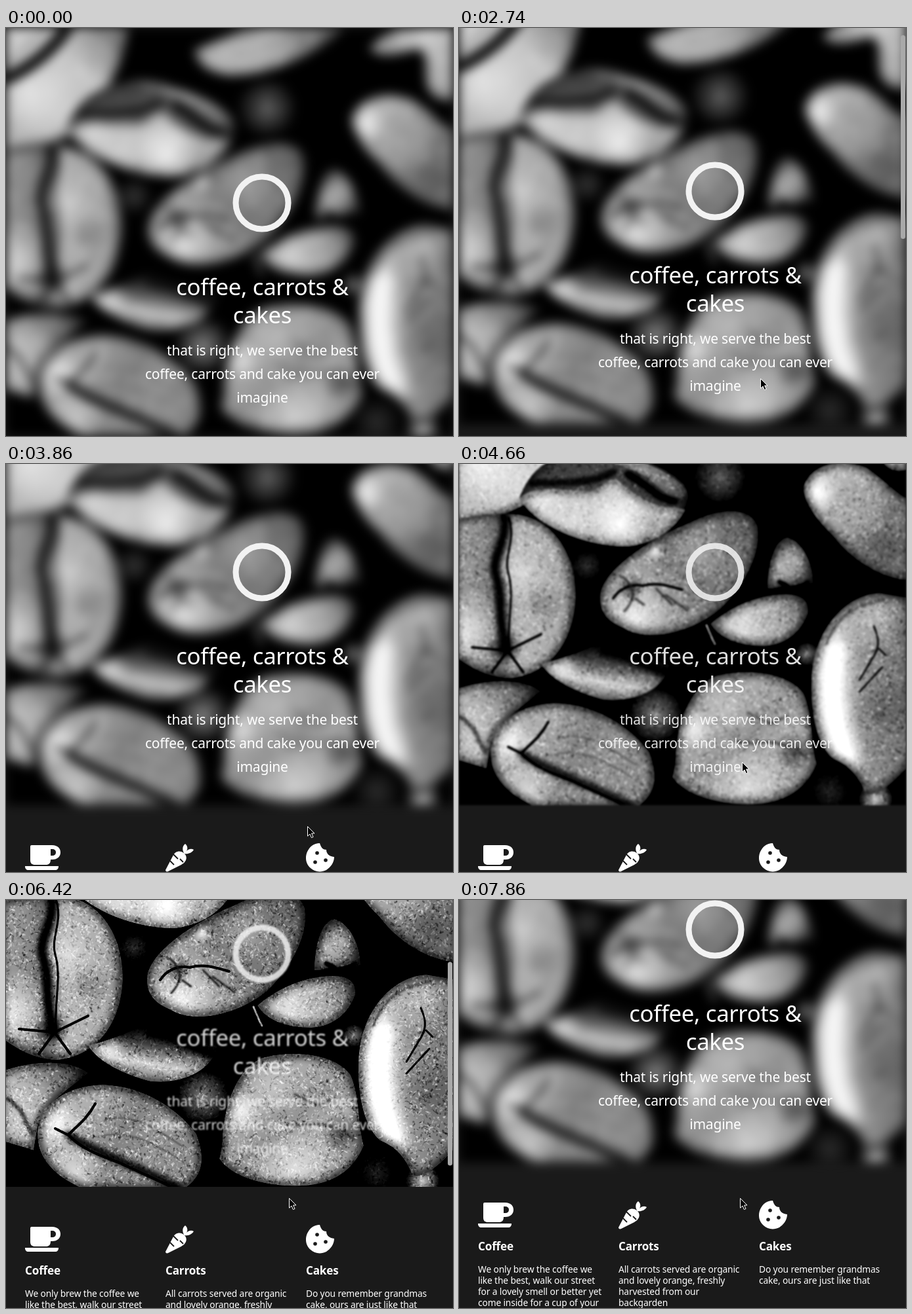
Animation, 681 px wide and 623 px high, one loop 8000 ms. Source, as an HTML page with a canvas:

```html
<!DOCTYPE html>
<html lang="en">
<head>
<meta charset="utf-8">
<title>coffee, carrots &amp; cakes</title>
<style>
  html, body { margin: 0; width: 100%; height: 100%; overflow: hidden; background: #1a1a1a; }
  #stage { position: relative; width: 681px; height: 623px; overflow: hidden; background: #1a1a1a; }
  #page, #page > *, #bar, #cursor { position: absolute; left: 0; top: 0; }
  #page { width: 681px; height: 1248px; }
  svg { overflow: visible; fill: #fff; }
  text { font-family: "Noto Sans", "Open Sans", sans-serif; letter-spacing: -.01em; }
  #hero text { text-anchor: middle; }
  .title { font-size: 34.8px; }
  .lead { font-size: 21px; }
  .head { font-size: 17.1px; font-weight: 700; }
  .copy { font-size: 13.77px; }
  #bar { left: 673px; width: 7px; height: 311px; border-radius: 4px; background: #a9a9a9; opacity: 0; }
</style>
</head>
<body>
<div id="stage">
  <div id="page">
    <canvas id="photo" width="681" height="623"></canvas>
    <svg id="hero" width="681" height="623">
      <circle cx="390" cy="267" r="40" fill="none" stroke="#f2f2f2" stroke-width="9"/>
    </svg>
    <svg id="info" width="681" height="1248">
      <path fill-rule="evenodd" d="M39 684H70C79 684 83 689 83 695S79 706 70 706H68C68 712 65 714 61 714H44C40 714 37 712 37 707V686Q37 684 39 684ZM68 690V700H70C74 700 76 698 76 695S74 690 70 690Z"/>
      <path d="M29 716H80C80 720 78 722 75 722H34C31 722 29 720 29 716Z"/>
      <path d="M243 722C243 724 245 725 247 724L267 714C275 710 277 702 272 697C266 691 258 693 255 699L243 722ZM271 696C268 690 269 685 273 682C277 685 277 690 275 693C279 689 283 689 286 691C283 696 277 698 272 697Z"/>
      <path d="M255 698L262 705M250 708L256 714M270 710L265 705" stroke="#1a1a1a" stroke-width="1.8" fill="none"/>
      <path d="M478 681C480 688 483 691 488 691C488 697 492 701 500 702C500 711 494 718 488 722C480 726 470 725 464 719C457 713 455 703 459 694C463 686 469 681 478 681Z"/>
      <g fill="#1a1a1a"><circle cx="474" cy="696" r="2.8"/><circle cx="471" cy="710" r="2.8"/><circle cx="487" cy="707" r="2.8"/></g>
    </svg>
  </div>
  <div id="bar"></div>
  <svg id="cursor" width="14" height="20"><path d="M.5 .5V15.2L4 12L6.4 17.6L9 16.5L6.6 11H11Z" fill="#000" stroke="#fff"/></svg>
</div>
<script>
const $ = id => document.getElementById(id);

// ---- text ----
function addText(parent, cls, x, y, pitch, lines) {
  lines.forEach((line, i) => {
    const el = document.createElementNS(parent.namespaceURI, 'text');
    el.setAttribute('class', cls);
    el.setAttribute('x', x);
    el.setAttribute('y', y + i * pitch);
    el.textContent = line;
    parent.append(el);
  });
}
addText($('hero'), 'title', 390.5, 408, 43, ['coffee, carrots &', 'cakes']);
addText($('hero'), 'lead', 390.5, 500, 36,
  ['that is right, we serve the best', 'coffee, carrots and cake you can ever', 'imagine']);
[
  [29, 'Coffee', ['We only brew the coffee we', 'like the best, walk our street',
    'for a lovely smell or better yet', 'come inside for a cup of your']],
  [243, 'Carrots', ['All carrots served are organic', 'and lovely orange, freshly',
    'harvested from our', 'backgarden']],
  [457, 'Cakes', ['Do you remember grandmas', 'cake, ours are just like that']]
].forEach(([x, head, copy]) => {
  addText($('info'), 'head', x, 757, 0, [head]);
  addText($('info'), 'copy', x, 791, 17, copy);
});

// ---- coffee beans ----
const ctx = $('photo').getContext('2d');
const grey = (v, a = 1) => `rgba(${v},${v},${v},${a})`;

function line(d, width, tone, blur = 0) {
  ctx.filter = blur ? `blur(${blur}px)` : 'none';
  ctx.lineWidth = width;
  ctx.lineCap = ctx.lineJoin = 'round';
  ctx.strokeStyle = grey(tone);
  ctx.stroke(new Path2D(d));
  ctx.filter = 'none';
}

function glow(x, y, r, tone) {
  const g = ctx.createRadialGradient(x, y, 0, x, y, r);
  g.addColorStop(0, grey(tone));
  g.addColorStop(1, grey(tone, 0));
  ctx.fillStyle = g;
  ctx.fillRect(x - r, y - r, 2 * r, 2 * r);
}

// A shape with a tone ramp along an axis, inner details and a shaded rim.
function bean(d, axis, tones, details = () => {}, rim = 12) {
  const path = new Path2D(d), g = ctx.createLinearGradient(...axis);
  tones.forEach((v, i) => g.addColorStop(i / (tones.length - 1), grey(v)));
  ctx.save();
  ctx.clip(path);
  ctx.fillStyle = g;
  ctx.fill(path);
  details();
  ctx.filter = 'blur(6px)';
  ctx.lineWidth = rim;
  ctx.strokeStyle = grey(0, .7);
  ctx.stroke(path);
  ctx.restore();
}

function drawPhoto() {
  ctx.fillStyle = '#000';
  ctx.fillRect(0, 0, 681, 623);
  ctx.save();
  ctx.translate(0, 102);

  glow(398, 20, 46, 95);
  glow(195, 155, 30, 55);
  glow(300, 383, 45, 130);
  glow(565, 500, 40, 45);
  glow(530, 290, 20, 120);
  glow(635, 512, 28, 190);

  bean('M286-70C320-85 370-106 400-112H525C500-75 420-30 350-27C310-28 286-45 286-70Z',
    [320, -40, 500, -100], [185, 170, 90]);
  bean('M552-72C570-98 610-112 690-112V5C668 18 644 8 638-20C636-45 642-70 622-66C590-56 558-56 552-72Z',
    [560, -70, 675, -20], [170, 205, 170]);

  bean('M-10-115H190C186-60 150 30 100 62C65 82 30 86-10 88Z', [170, -80, 20, 60], [130, 200, 205, 185], () => {
    glow(40, 0, 60, 225);
    line('M100-112C75-72 40-42-5-22', 20, 12, 2);
    line('M75-112L-5-42', 3, 90, 2);
  });

  bean('M92 52C100 30 115 5 140-5C180-25 215-30 250-16C310 0 352 25 350 50C345 85 315 115 260 126C195 128 115 95 92 52Z',
    [110, 0, 340, 60], [70, 75, 60], () => {
      line('M112 30C150 25 190 36 235 12', 12, 22, 2);
    });
  bean('M195-22C250-18 335 10 348 45C335 62 320 50 300 32C270 2 220 0 195-22Z',
    [200, -20, 345, 50], [130, 165, 90], undefined, 5);
  bean('M92 52C110 34 150 38 200 42C215 38 225 22 240 24C262 40 285 66 330 66L345 70C330 100 300 120 260 126C195 128 115 95 92 52Z',
    [180, 40, 210, 126], [195, 205, 165], () => {
      glow(245, 92, 45, 240);
      glow(130, 58, 40, 215);
    }, 8);
  line('M258 16C285 30 300 52 328 57', 13, 8, 2);

  bean('M-8 85C20 78 60 74 90 77C140 85 178 130 178 205C175 270 140 320 80 327C45 328 15 310-8 292Z',
    [0, 200, 178, 200], [150, 140, 105, 175, 170, 165, 130], () => {
      glow(10, 255, 65, 215);
      glow(92, 165, 45, 205);
      glow(130, 215, 30, 130);
      glow(70, 280, 28, 20);
      line('M68 80C78 112 48 140 56 170C68 200 58 230 72 285', 15, 12, 3);
      line('M76 82C88 118 66 140 76 170C84 205 74 235 76 280', 3, 5);
      line('M20 280L74 285L125 260M50 318L74 285L98 318', 4, 8, .6);
    });

  bean('M215 200C220 160 290 115 350 90C400 65 445 65 455 95C462 130 440 180 400 220C360 255 290 275 250 250C225 240 213 225 215 200Z',
    [235, 235, 445, 85], [160, 165, 120, 125, 95], () => {
      glow(268, 232, 48, 225);
      glow(298, 134, 16, 225);
      glow(262, 190, 22, 60);
      glow(365, 135, 45, 160);
      line('M235 205C245 190 262 182 280 186C300 180 320 186 340 192', 4, 10, .5);
      line('M245 170C270 185 270 205 252 225M268 205L282 215M315 200L348 224M300 190L325 215', 3, 45, .8);
    });

  bean('M470 180C472 145 482 115 500 112C525 118 540 155 540 182C520 190 500 192 470 190Z',
    [475, 120, 525, 185], [80, 165, 70], () => glow(498, 158, 28, 170));
  bean('M383 244C405 225 440 205 480 200C510 196 535 200 532 228C522 255 500 276 465 278C425 278 395 265 383 244Z',
    [390, 250, 530, 215], [165, 190, 165, 95], () => glow(430, 246, 34, 210));
  line('M472 198C490 185 508 195 530 182M500 186L488 180', 7, 4, 1);
  line('M377 246C382 258 386 268 390 275', 3, 150, .6);

  bean('M-8 345C40 328 95 325 125 347C100 370 60 390 48 430L42 465L-8 450Z',
    [10, 400, 120, 345], [185, 140, 75], () => {
      glow(18, 395, 55, 185);
      line('M0 385C25 400 30 420 40 440', 5, 45, 2);
    });
  bean('M125 305C150 300 180 288 215 272L322 306C315 345 265 365 220 360C180 350 140 330 125 305Z',
    [215, 275, 200, 358], [20, 75, 195, 130], () => {
      glow(152, 313, 34, 225);
      line('M220 285C255 290 275 305 315 318', 16, 12, 4);
    }, 7);

  bean('M330 440C335 385 355 340 390 324C430 312 500 315 525 350C540 385 535 420 545 458C530 495 500 516 455 519C400 522 345 508 325 478C328 465 330 455 330 440Z',
    [360, 330, 510, 510], [140, 165, 145, 175, 145], () => {
      glow(358, 405, 36, 225);
      glow(440, 492, 60, 205);
      glow(405, 368, 44, 185);
      glow(512, 440, 35, 75);
      line('M425 425C455 432 480 410 530 448M440 380L475 396L500 385', 4, 75, 1.5);
    });

  bean('M48 440C50 390 100 365 150 365C210 368 260 400 290 440C305 480 300 505 270 525H120C75 505 48 480 48 440Z',
    [70, 400, 270, 500], [175, 165, 130, 145, 135], () => {
      glow(78, 425, 40, 230);
      glow(105, 500, 50, 205);
      line('M95 442C130 465 200 490 262 522', 13, 18, 4);
      line('M136 394C122 420 105 430 95 442C118 466 150 475 172 484L250 520M95 442L75 432', 4, 5, .5);
      line('M150 420C190 405 225 430 270 460M140 445C190 430 235 460 280 490', 2, 85, 1);
    });

  bean('M525 35C535 0 580-10 620 5C650 25 670 50 690 55V178C650 178 600 150 570 110C545 85 525 60 525 35Z',
    [545, 40, 670, 140], [185, 160, 120, 110], () => {
      glow(546, 44, 34, 245);
      glow(605, 70, 50, 165);
      glow(650, 130, 35, 90);
    });
  bean('M537 330C540 250 590 200 640 197L690 205V455C660 490 640 505 620 505C612 485 600 462 570 450C545 430 535 380 537 330Z',
    [545, 340, 681, 340], [200, 190, 145, 130, 115], () => {
      glow(630, 235, 50, 180);
      glow(655, 375, 55, 100);
      line('M574 285C564 335 568 395 592 448', 36, 252, 10);
      line('M560 275C575 235 600 215 645 208', 4, 90, 1.5);
      line('M632 248C642 270 640 282 628 300L610 330M640 282L650 292M645 310L610 348', 3, 20, .6);
    });
  ctx.restore();

  // Grain that only shows on the lit surfaces.
  let seed = 7;
  const rand = () => (seed = seed * 16807 % 2147483647) / 2147483647;
  ctx.globalCompositeOperation = 'overlay';
  for (let i = 0; i < 26000; i++) {
    ctx.fillStyle = grey(rand() < .5 ? 0 : 255, .1 + rand() * .3);
    ctx.beginPath();
    ctx.ellipse(rand() * 681, rand() * 623, 1 + rand() * 2.5, .6 + rand(), rand() * 3, 0, 7);
    ctx.fill();
  }
  ctx.globalCompositeOperation = 'source-over';
}
drawPhoto();

// ---- motion: the screen refreshes every 160 ms ----
const LOOP = 8000, STEP = 160, PHASE = 20;
const scrollSteps = [
  [0, 0], [2740, 18], [2900, 45], [3060, 69], [3220, 85], [3380, 94], [3540, 99], [3700, 102],
  [6100, 126], [6260, 161], [6420, 185], [6580, 201], [6740, 212], [6900, 219], [7060, 222]
];
const cursorSteps = [
  [0, -40, -40], [500, 491, 602], [660, 484, 570], [820, 476, 535], [980, 469, 508], [1140, 468, 502],
  [1460, 456, 525], [1620, 446, 543], [1780, 452, 541], [1940, 459, 535],
  [3860, 459, 553], [4020, 460, 560], [4180, 452, 514], [4340, 440, 478], [4500, 433, 460], [4660, 431, 455],
  [7220, 428, 455]
];
const at = (steps, t) => steps.findLast(s => s[0] <= t);
const clamp = v => Math.min(1, Math.max(0, v));

// The CSS "ease" curve: cubic-bezier(.25, .1, .25, 1).
function ease(x) {
  let lo = 0, hi = 1;
  const curve = (u, a, b) => 3 * a * u * (1 - u) ** 2 + 3 * b * u * u * (1 - u) + u ** 3;
  for (let i = 0; i < 18; i++) {
    const mid = (lo + hi) / 2;
    if (curve(mid, .25, .25) < x) lo = mid; else hi = mid;
  }
  return curve(lo, .1, 1);
}

const sharpness = t => t < 7060
  ? ease(clamp((t - 4180) / 1000))
  : 1 - ease(clamp((t - 7060) / 850));

const barOpacity = t =>
  t >= 2740 && t < 3700 || t >= 6100 && t < 7060 ? 1 : 0;

function render(t) {
  const scroll = at(scrollSteps, t)[1];
  const [, x, y] = at(cursorSteps, t);
  const p = sharpness(t);
  $('page').style.transform = `translateY(${-scroll}px)`;
  $('photo').style.filter = `blur(${8 * (1 - p)}px) contrast(${1 + .2 * p})`;
  $('hero').style.filter = p > .001 ? `blur(${p}px)` : 'none';
  $('hero').style.opacity = 1 - .17 * p;
  $('cursor').style.transform = `translate(${x}px, ${y}px)`;
  $('bar').style.transform = `translateY(${2 + scroll / 2}px)`;
  $('bar').style.opacity = barOpacity(t);
}

let shown = -1;
function tick() {
  const t = performance.now() % LOOP;
  const held = Math.max(0, Math.floor((t - PHASE) / STEP) * STEP + PHASE);
  if (held !== shown) render(shown = held);
  requestAnimationFrame(tick);
}
tick();
</script>
</body>
</html>
```
